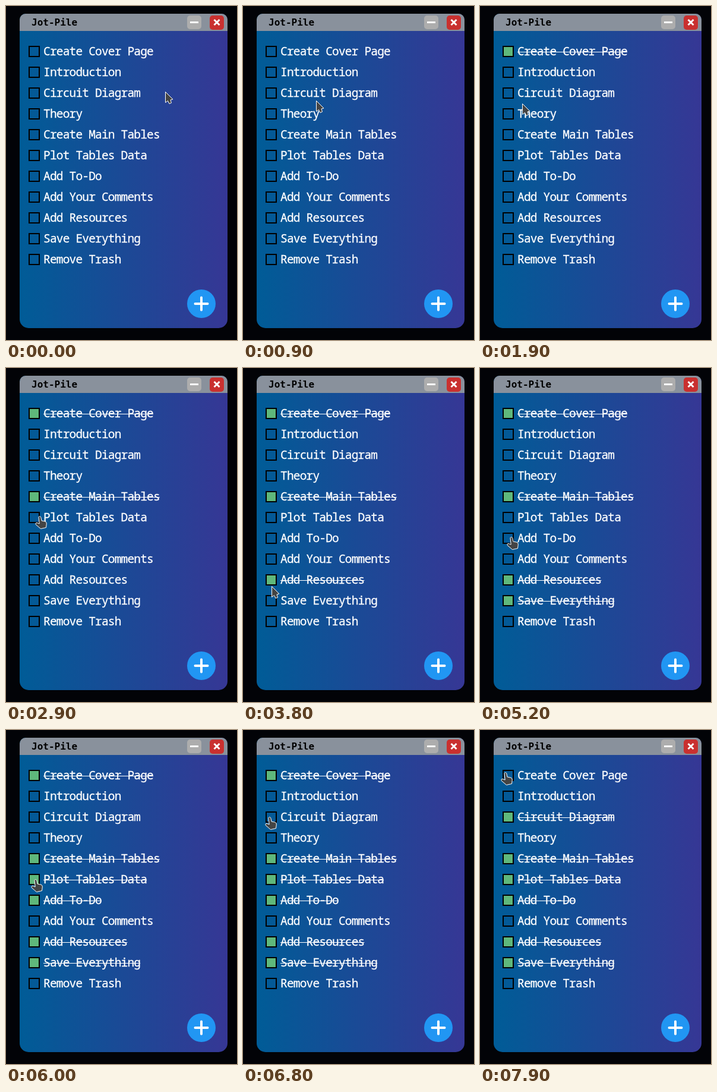
Animation of 389 by 562 pixels, one loop 8000 ms. Source, as an HTML page:

```html
<!DOCTYPE html>
<html lang="en">
<head>
<meta charset="utf-8">
<title>To-do list</title>
<style>
  html, body { margin: 0; width: 100%; height: 100%; overflow: hidden; background: #020307; }
  svg { display: block; width: 389px; height: 562px; }
  .title { font: bold 16px "DejaVu Sans Mono", monospace; }
  .item { font: 19.5px "Noto Sans Mono", monospace; letter-spacing: -.82px; fill: #fff; stroke: #fff; stroke-width: .3; }
  #cursor path { fill: #444; stroke: #fff; stroke-linejoin: round; }
</style>
</head>
<body>
<svg viewBox="0 0 389 562">
  <defs>
    <linearGradient id="blue">
      <stop stop-color="#005c97"/>
      <stop offset="1" stop-color="#363795"/>
    </linearGradient>
    <clipPath id="frame">
      <path d="M23 23a10 10 0 0 1 10-10H363a10 10 0 0 1 10 10V527a15 15 0 0 1-15 15H38a15 15 0 0 1-15-15Z"/>
    </clipPath>
  </defs>
  <g clip-path="url(#frame)">
    <rect x="23" y="13" width="350" height="529" fill="url(#blue)"/>
    <rect x="23" y="13" width="350" height="29" fill="#89919c"/>
  </g>
  <text class="title" x="43" y="33">Jot-Pile</text>
  <rect x="305" y="16" width="24" height="23" rx="5" fill="#adadad"/>
  <path d="M310 27.5h14" stroke="#fff" stroke-width="3"/>
  <rect x="343" y="16" width="24" height="24" rx="5" fill="#c9302f"/>
  <path d="M350.5 23l9 9m0-9l-9 9" stroke="#fff" stroke-width="3"/>
  <circle cx="329" cy="501" r="24" fill="#2196f3"/>
  <path d="M318.5 501h21m-10.5-10.5v21" stroke="#fff" stroke-width="4" stroke-linecap="round"/>
  <g id="list"></g>
  <g id="cursor">
    <path id="arrow" d="M.5 .5V18.5L4.5 15.5L7 20.5L10.5 19L9 14L13 13Z"/>
    <path id="hand" transform="translate(-7 0)" d="M6 2.5C5.8 0 9.3 0 9.8 2.2L11 8L17 9.2Q19.5 10 19.3 13L18.5 19.5L9.5 21.5L1.3 14.5Q0 11.5 3 11.3L7.2 13Z"/>
  </g>
</svg>
<script>
const LOOP = 8000, STEP = 100;
const TOP = 67, PITCH = 35, BOX = 19, LEFT = 38, CHAR = 10.88;

const labels = [
  "Create Cover Page", "Introduction", "Circuit Diagram", "Theory",
  "Create Main Tables", "Plot Tables Data", "Add To-Do", "Add Your Comments",
  "Add Resources", "Save Everything", "Remove Trash"
];

// Pointer moves: power shapes the ease-out, bow bends the path sideways.
// A click toggles the row under the move's end point.
const origin = { x: 268, y: 144 };
const moves = [
  { leave: 0, arrive: 100, x: 281, y: 155 },
  { leave: 300, arrive: 1300, x: 47, y: 74, click: 1600, power: 1, bow: -58 },
  { leave: 1700, arrive: 2400, x: 52, y: 217, click: 2600, power: 3, bow: -23 },
  { leave: 2750, arrive: 3400, x: 50, y: 354, click: 3700, power: 1, bow: -7 },
  { leave: 3700, arrive: 4200, x: 45, y: 390, click: 4300 },
  { leave: 4400, arrive: 4800, x: 52, y: 284, click: 5400 },
  { leave: 5400, arrive: 5900, x: 49, y: 251, click: 6000 },
  { leave: 6000, arrive: 6800, x: 44, y: 146, click: 7000, power: 3 },
  { leave: 7000, arrive: 7400, x: 42, y: 71, click: 7700 }
];

const byId = id => document.getElementById(id);
const rowAt = y => Math.floor((y - TOP) / PITCH);
const show = (node, visible) => node.setAttribute("visibility", visible ? "visible" : "hidden");

function add(parent, tag, attrs) {
  const node = document.createElementNS("http://www.w3.org/2000/svg", tag);
  for (const key in attrs) node.setAttribute(key, attrs[key]);
  return parent.appendChild(node);
}

const rows = labels.map((label, i) => {
  const list = byId("list"), top = TOP + PITCH * i;
  const box = add(list, "rect", { x: LEFT + 1, y: top + 1, width: BOX - 2, height: BOX - 2, stroke: "#000", "stroke-width": 2 });
  add(list, "text", { class: "item", x: 63, y: top + 16 }).textContent = label;
  const strike = add(list, "rect", { x: 63, y: top + 10, width: label.length * CHAR, height: 1, fill: "#fff" });
  return { box, strike };
});

function pointerAt(t) {
  const i = moves.findLastIndex(move => t >= move.leave);
  const from = moves[i - 1] || origin;
  const { leave, arrive, x, y, power = 2, bow = 0 } = moves[i];
  const u = Math.min(1, (t - leave) / (arrive - leave));
  const eased = 1 - (1 - u) ** power;
  const dx = x - from.x, dy = y - from.y;
  const side = bow * Math.sin(Math.PI * eased) / Math.hypot(dx, dy);
  return [
    Math.round(from.x + dx * eased - dy * side),
    Math.round(from.y + dy * eased + dx * side)
  ];
}

function overBox(x, y) {
  const row = rowAt(y);
  return x >= LEFT && x <= LEFT + BOX && row >= 0 && row < rows.length &&
    y - TOP - row * PITCH < BOX;
}

function draw(time) {
  const t = Math.floor(time % LOOP / STEP) * STEP;
  rows.forEach(({ box, strike }, i) => {
    const clicks = moves.filter(move => t >= move.click && rowAt(move.y) === i).length;
    const done = clicks % 2 === 1;
    box.setAttribute("fill", done ? "#5fb87b" : "none");
    show(strike, done);
  });
  const [x, y] = pointerAt(t), hovering = overBox(x, y);
  byId("cursor").setAttribute("transform", `translate(${x} ${y})`);
  show(byId("hand"), hovering);
  show(byId("arrow"), !hovering);
}

const start = performance.now();
function tick() {
  draw(performance.now() - start);
  requestAnimationFrame(tick);
}
tick();
</script>
</body>
</html>
```
